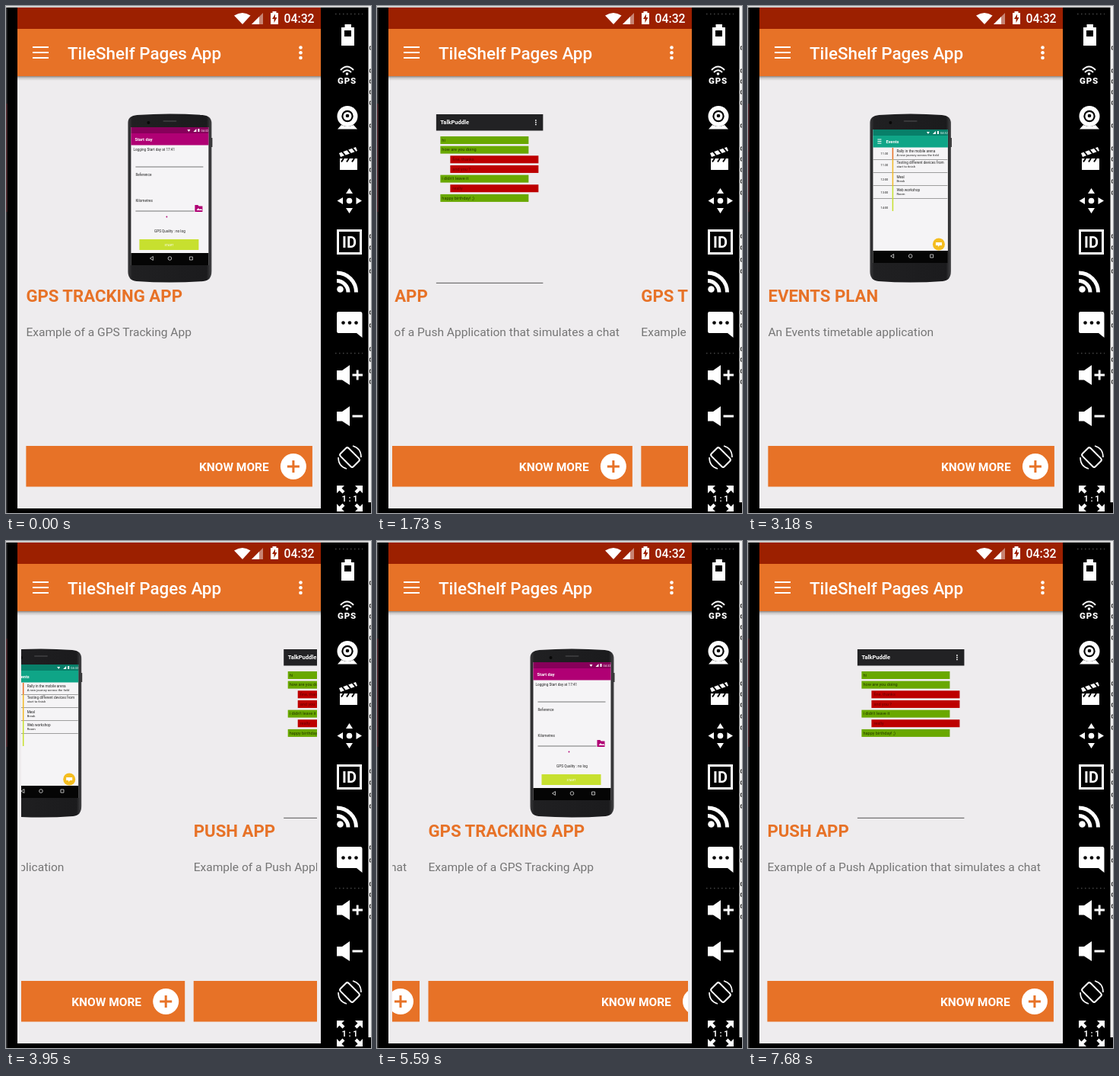
Animation, 480 px wide and 665 px high, one loop 7.72 s. Source, as an HTML page:

```html
<!DOCTYPE html>
<html lang="en">
<head>
<meta charset="utf-8">
<title>Circular pager</title>
<style>
html, body { margin: 0; width: 100%; height: 100%; overflow: hidden; background: #000; }
svg { display: block; width: 480px; height: 665px; font-family: Roboto, "Liberation Sans", sans-serif; }
.title { font-size: 22.2px; font-weight: 700; fill: #e77227; }
.note { font-size: 15.55px; fill: #757575; }
.more { font-size: 15.5px; font-weight: 700; fill: #fff; }
.tiny { font-size: 4.7px; fill: #222; }
</style>
</head>
<body>
<svg viewBox="0 0 480 665">
  <defs>
    <clipPath id="view"><rect x="20" y="92" width="389" height="567"/></clipPath>
    <linearGradient id="shade" x2="0" y2="1">
      <stop stop-color="#8d8784"/><stop offset=".4" stop-color="#c9c6c6"/><stop offset="1" stop-color="#eeecee"/>
    </linearGradient>
    <linearGradient id="body">
      <stop stop-color="#3a3a3c"/><stop offset=".05" stop-color="#202022"/><stop offset=".94" stop-color="#1b1b1d"/><stop offset="1" stop-color="#454547"/>
    </linearGradient>
  </defs>

  <!-- window edges -->
  <rect width="480" height="665"/>
  <rect width="480" height="2" fill="#d0d0d0"/>
  <rect y="2" width="1.5" height="663" fill="#38383a"/>
  <rect y="128" width="1.5" height="142" fill="#54282f"/>
  <rect x="476.5" width="3.5" height="651" fill="#eee"/>
  <g id="scraps" fill="none"></g>

  <!-- app screen -->
  <rect x="15" y="2" width="399" height="657" fill="#eeecee"/>
  <g id="pages" clip-path="url(#view)"></g>
  <rect x="15" y="92" width="399" height="6" fill="url(#shade)"/>
  <rect x="15" y="2" width="399" height="28" fill="#9c2000"/>
  <rect x="15" y="30" width="399" height="62" fill="#e77227"/>
  <g fill="#fff">
    <path d="M300 12.5Q311 5.500 321.500 12.500L311 24Z"/>
    <path d="M338 9V24H323Z" opacity=".45"/>
    <path d="M333 14V24H323Z"/>
    <path d="M350.500 9V7H355.500V9H358V24H348V9Z"/>
    <path d="M354 10.500L350 17H352.500V22L356.500 15H354Z" fill="#9c2000"/>
    <text x="365.500" y="22" font-size="15.8" font-weight="500">04:32</text>
    <path d="M35 54H56M35 61H56M35 68H56" stroke="#fff" stroke-width="2.2"/>
    <text x="81" y="69.500" font-size="22.4" font-weight="500">TileShelf Pages App</text>
    <circle cx="387.500" cy="54.500" r="2.300"/><circle cx="387.500" cy="61.300" r="2.300"/><circle cx="387.500" cy="68" r="2.300"/>
  </g>

  <!-- emulator tool strip -->
  <g fill="#fff" stroke="none">
    <path d="M433 10.500H469M433 455.500H469" stroke="#444" stroke-width="1.500" stroke-dasharray="1.500 3.500"/>
    <path d="M445.500 24H454V28H458V52H441V28H445.500Z"/>
    <rect x="445" y="32" width="9" height="8" fill="#000"/>
    <path d="M440 84Q448.500 75 457 84M443 87Q448.500 81.500 454 87" fill="none" stroke="#fff" stroke-width="2"/>
    <circle cx="448.500" cy="89" r="1.800"/>
    <text x="448.500" y="102" font-size="11.5" font-weight="900" text-anchor="middle" letter-spacing=".8">GPS</text>
    <circle cx="449" cy="144.500" r="13.500"/>
    <circle cx="449" cy="144.500" r="7.700" fill="#000"/>
    <circle cx="449" cy="144.500" r="5.500"/>
    <circle cx="449" cy="144" r="2.300" fill="#000"/>
    <path d="M441 156Q449 160 457 156L462 161.500H436Z"/>
    <rect x="439" y="200" width="23" height="15"/>
    <path d="M438 193L460 185L462 190L440 198Z"/>
    <path d="M442 191L446 196M449 188.500L453 193.500M455.500 186L459.500 191M444 200L441 204.500M451 200L448 204.500M458 200L455 204.500" stroke="#000" stroke-width="2"/>
    <path d="M451.500 239L456 246H447ZM451.500 272L456 265H447ZM435.500 255.500L443 251V260ZM468 255.500L460.500 251V260Z"/>
    <circle cx="451.500" cy="255.500" r="3.800"/>
    <rect x="436.500" y="294.500" width="30" height="30" fill="none" stroke="#fff" stroke-width="3"/>
    <text x="451.500" y="317" font-size="20" font-weight="700" text-anchor="middle">ID</text>
    <circle cx="439.500" cy="371.500" r="4.300"/>
    <path d="M435 360.500A15 15 0 0 1 450 375.500M435 350A25.500 25.500 0 0 1 460.500 375.500" fill="none" stroke="#fff" stroke-width="5"/>
    <path d="M437 401H466Q468.500 401 468.500 404V435L461 429H437Q435 429 435 426V404Q435 401 437 401Z"/>
    <g fill="#000"><circle cx="443.500" cy="415.500" r="2.300"/><circle cx="452" cy="415.500" r="2.300"/><circle cx="460.500" cy="415.500" r="2.300"/></g>
    <path id="speaker" d="M435 478H442L452 471V497L442 490.500H435Z"/>
    <use href="#speaker" y="54"/>
    <path d="M455.500 484H469M462.200 477.500V490.500M455.500 538H469" stroke="#fff" stroke-width="2.800"/>
    <g fill="none" stroke="#fff" stroke-width="2">
      <rect x="444.500" y="580" width="15" height="24" rx="2.500" transform="rotate(-45 452 592)"/>
      <path d="M437 592Q437 604 448 607M467 592Q467 580 456 577" stroke-width="1.600"/>
    </g>
    <g id="corners"></g>
    <text x="452" y="650" font-size="11" font-weight="700" text-anchor="middle">1 : 1</text>
  </g>
</svg>
<script>
const LOOP = 7720, PAGE = 388, CYCLE = 3 * PAGE, REST = 26.4, SWIPE = 450;

// Start time and travel of each swipe; positive travel moves the pages right.
const swipes = [[1400, PAGE], [2069, PAGE], [3746.4, -PAGE], [4584.4, -PAGE], [5500, PAGE - 1]];

const byId = id => document.getElementById(id);
const rect = (x, y, w, h, fill, more = '') => `<rect x="${x}" y="${y}" width="${w}" height="${h}" fill="${fill}" ${more}/>`;
const tiny = (x, y, s, more = '') => `<text class="tiny" x="${x}" y="${y}" ${more}>${s}</text>`;
const line = (d, color, width = .8) => `<path d="${d}" stroke="${color}" stroke-width="${width}" fill="none"/>`;

function phone(x, y, w, h, bar, head, title, indent) {
  const left = x - 4, right = x + w + 4, mid = x + w / 2;
  const navY = y + h - 9;
  return `<path d="M${left} 153Q${left} 144 ${left + 12} 143Q${mid} 140 ${right - 12} 143Q${right} 144 ${right} 154V348Q${right} 360 ${right - 11} 361Q${mid} 364 ${left + 11} 361Q${left} 360 ${left} 348Z" fill="url(#body)"/>
    ${rect(right - .5, 173, 1.5, 12, '#333')}
    <circle cx="${left + 27}" cy="153" r="2" fill="#080808"/>
    ${rect(mid - 9, 150, 18, 2, '#38383a', 'rx="1"')}
    ${rect(x, y, w, h, '#f5f4f6')}${rect(x, y, w, 8, bar)}${rect(x, y + 8, w, 15.5, head)}
    <path d="M${x + w - 28} ${y + 3}h4l-2 3zM${x + w - 20} ${y + 6}h4v-4zM${x + w - 14} ${y + 2}h2v4h-2z" fill="#fff"/>
    <text x="${x + w - 10}" y="${y + 6}" font-size="4" fill="#fff">04:32</text>
    <text x="${x + indent}" y="${y + 17.5}" font-size="5.7" font-weight="700" fill="#fff">${title}</text>
    ${rect(x, y + h - 16, w, 16, '#050505')}
    ${line(`M${mid - 26} ${navY}l4 -2.500v5zM${mid + 26} ${navY - 2}h4v4h-4z`, '#ddd')}
    <circle cx="${mid}" cy="${navY}" r="2.300" stroke="#ddd" stroke-width=".8" fill="none"/>`;
}

const gpsArt = `<g transform="translate(-26)">
  ${phone(164, 159, 102, 181, '#87005a', '#b00074', 'Start day', 5)}
  ${tiny(167, 190, 'Logging Start day at 17:41')}
  ${line('M170 211H259M170 269H247', '#555')}
  ${tiny(170, 223, 'Reference')}${tiny(170, 257, 'Kilometres')}
  <path d="M248 261h4l1 1.500h5v7.500h-10z" fill="#b00074"/>
  <path d="M250 268l2.500-3 2 2 1.500-1 2 2z" fill="#fff"/>
  <circle cx="211" cy="276.500" r=".9" fill="#b00074"/>
  ${tiny(215, 297, 'GPS Quality : no log', 'text-anchor="middle"')}
  ${rect(175, 306, 78, 14, '#c7e02f')}
  <text x="214" y="314.500" font-size="4" fill="#fff" text-anchor="middle">START</text>
</g>`;

const events = [
  [192, '11:30', 'Rally in the mobile arena', 'A new journey across the field'],
  [207, '11:30', 'Testing different devices from', 'start to finish'],
  [226, '12:00', 'Meal', 'Break'],
  [243, '13:00', 'Web workshop', 'Room'],
  [263, '14:00', '', '']
];
const eventsArt = `<g transform="translate(32)">
  ${phone(106, 162, 98.5, 175, '#087f69', '#0fa587', 'Events', 17)}
  ${line('M112 175h5M112 177.500h5M112 180h5', '#fff', 1)}
  ${line('M106 201.500H204M106 218.500H204M106 235.500H204M106 252.500H204', '#888', .8)}
  ${line('M132 186V201', '#e77227', 1.5)}${line('M132 201V236', '#f0b928', 1.5)}${line('M132 236V269', '#c7e02f', 1.5)}
  ${events.map(([y, hour, a, b]) => tiny(116, y + 3, hour, 'style="font-size:4px"') + tiny(137, y, a) + tiny(137, y + 5, b, 'style="font-size:4.2px"')).join('')}
  <circle cx="192.500" cy="312.500" r="8" fill="#f4bd20"/>
  <path d="M188.500 310h8v4h-3l-2 2v-2h-3z" fill="#fff"/>
</g>`;

const chat = ['hi', 'how are you doing', '!fine, thanks', '!and you ?', 'i didn\'t leave it', '!really', 'happy birthday! ;)'];
const pushArt = `<g transform="translate(-25)">
  ${rect(143.5, 142, 140.5, 21.5, '#222224')}
  <text x="149" y="155.300" font-size="7.5" font-weight="700" fill="#fff">TalkPuddle</text>
  ${[150, 152.7, 155.4].map(y => `<circle cx="274.500" cy="${y}" r=".9" fill="#fff"/>`).join('')}
  ${chat.map((s, i) => {
    const reply = s[0] === '!', y = 171 + i * 12.65;
    return rect(reply ? 162 : 149, y, 116, 10, reply ? '#bd0000' : '#69a800')
      + tiny(reply ? 165 : 151, y + 6.8, reply ? s.slice(1) : s, `style="font-size:5.6px;fill:${reply ? '#6b0000' : '#243800'}"`);
  }).join('')}
  ${line('M143.500 363.300H284', '#555', 1)}
</g>`;

const page = ([title, note, art]) => `<g>${art}
  <text class="title" x="0" y="387.500">${title}</text>
  <text class="note" x="0" y="432.500">${note}</text>
  ${rect(0, 577, 376.5, 53.5, '#e77227')}
  <text class="more" x="227.500" y="610">KNOW MORE</text>
  <circle cx="351.500" cy="604" r="17" fill="#fff"/>
  ${line('M343.500 604H359.500M351.500 596V612', '#e77227', 3)}</g>`;

byId('pages').innerHTML = [
  ['GPS TRACKING APP', 'Example of a GPS Tracking App', gpsArt],
  ['EVENTS PLAN', 'An Events timetable application', eventsArt],
  ['PUSH APP', 'Example of a Push Application that simulates a chat', pushArt]
].map(page).join('');

byId('corners').innerHTML = [[1, 1], [-1, 1], [1, -1], [-1, -1]].map(([sx, sy]) =>
  `<path transform="translate(452 646) scale(${sx} ${sy})" d="M17 17V7L13.500 10.500L9.500 6.500L6.500 9.500L10.500 13.500L7 17Z"/>`).join('');

byId('scraps').innerHTML = [55, 85, 99, 113, 127, 157, 187, 201, 215, 230, 245, 302, 317, 333, 348, 402, 419, 450, 464, 479, 493]
  .map(y => line(`M480 ${y - 2}H478.500V${y + 2}H480`, '#222', 1)).join('');

const pages = [...byId('pages').children];
const ease = u => u * u * (3 - 2 * u);
const clamp = u => Math.min(1, Math.max(0, u));
const mod = (a, n) => ((a % n) + n) % n;

function draw(t) {
  const shift = swipes.reduce((sum, [start, travel]) => sum + travel * ease(clamp((t - start) / SWIPE)), 0);
  pages.forEach((el, i) => {
    const x = mod(REST + (i + 1) * PAGE + shift, CYCLE) - PAGE;
    el.setAttribute('transform', `translate(${x.toFixed(2)})`);
  });
}

const begin = performance.now();
function tick() {
  draw((performance.now() - begin) % LOOP);
  requestAnimationFrame(tick);
}
tick();
</script>
</body>
</html>
```
